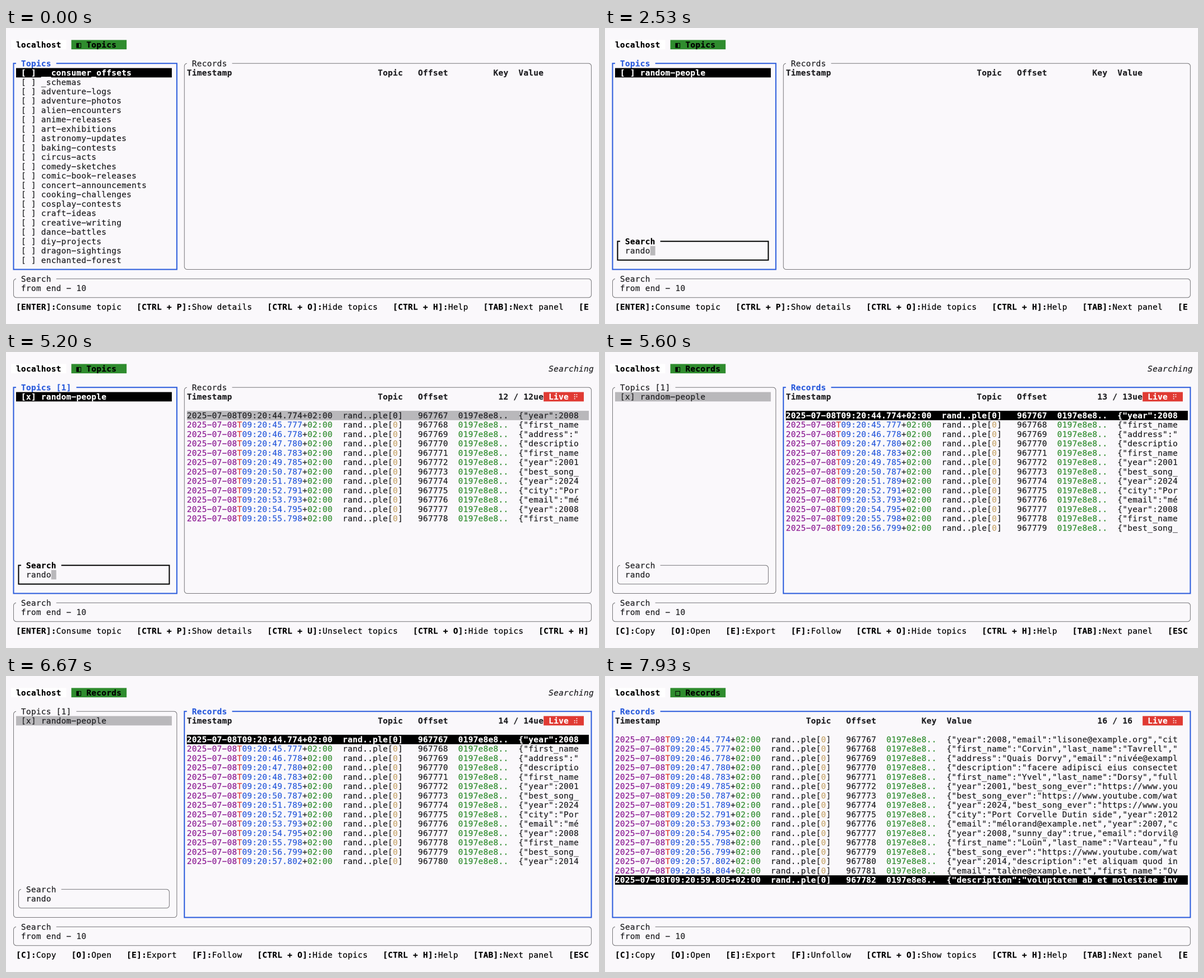
Recreate the animation shown at these times as an HTML page with a canvas. Size 1058 px wide and 529 px high, loop 8000 ms.

```html
<!DOCTYPE html>
<html lang="en">
<head>
<meta charset="utf-8">
<title>Topic browser</title>
<style>
  html, body { margin: 0; width: 100%; height: 100%; overflow: hidden; background: #faf8fb; }
  canvas { display: block; width: 1058px; height: 529px; }
</style>
</head>
<body>
<canvas id="screen" width="2116" height="1058"></canvas>
<script>
const ctx = document.getElementById('screen').getContext('2d');
ctx.scale(2, 2); // double resolution keeps fractional rows even
const LOOP = 8000;
const CW = 8.964, RH = 16.74, X0 = 9, Y0 = 21.4; // character grid
const BASELINE = 13.4;
const FONT = '14.4px "DejaVu Sans Mono", monospace';
const BG = '#faf8fb', INK = '#1f1f22', BLACK = '#000', WHITE = '#fff', GREY = '#b9b8bb', LINE = '#77767a';
const BLUE = '#2a5bdc', GREEN = '#2f8c2e', RED = '#e03a33', PURPLE = '#8c1b93', SAND = '#c6a56c';

// Moments of the session, in ms
const OPEN = 1470, TYPED = [1600, 1730, 2000, 2270, 2530], CONSUME = 4200;
const TAB = 5470, HIDE = 6730, FOUND = 7500, FOLLOW = 7800;
const ARRIVALS = [[4730, 12], [5260, 13], [6200, 14], [7190, 15], [7870, 16]];

const TOPICS = `__consumer_offsets _schemas adventure-logs adventure-photos alien-encounters
anime-releases art-exhibitions astronomy-updates baking-contests circus-acts comedy-sketches
comic-book-releases concert-announcements cooking-challenges cosplay-contests craft-ideas
creative-writing dance-battles diy-projects dragon-sightings enchanted-forest movie-trailers
pirate-adventures random-people space-exploration time-travel-logs travel-stories`.split(/\s+/);

const MILLIS = [774, 777, 778, 780, 783, 785, 787, 789, 791, 793, 795, 798, 799, 802, 804, 805];
const VALUES = [
  '{"year":2008,"email":"lisone@example.org","city"',
  '{"first_name":"Corvin","last_name":"Tavrell","fu',
  '{"address":"Quais Dorvy","email":"nivée@example.',
  '{"description":"facere adipisci eius consectetur',
  '{"first_name":"Yvel","last_name":"Dorsy","full_n',
  '{"year":2001,"best_song_ever":"https://www.youtu',
  '{"best_song_ever":"https://www.youtube.com/watch',
  '{"year":2024,"best_song_ever":"https://www.youtu',
  '{"city":"Port Corvelle Dutin side","year":2012,"',
  '{"email":"mélorand@example.net","year":2007,"cit',
  '{"year":2008,"sunny_day":true,"email":"dorvil@ex',
  '{"first_name":"Loün","last_name":"Varteau","full',
  '{"best_song_ever":"https://www.youtube.com/watch',
  '{"year":2014,"description":"et aliquam quod in e',
  '{"email":"talène@example.net","first_name":"Ovan',
  '{"description":"voluptatem ab et molestiae inven'
];

const px = col => X0 + col * CW;
const py = row => Y0 + row * RH;

function fill(col, row, cells, color) {
  ctx.fillStyle = color;
  ctx.fillRect(px(col), py(row), cells * CW, RH);
}

function text(col, row, str, color = INK, style = '') {
  ctx.font = `${style} ${FONT}`;
  ctx.fillStyle = ctx.strokeStyle = color;
  ctx.lineWidth = .2; // slightly fuller strokes, as on the terminal
  // the terminal face has a wide hyphen
  [...str.replace(/-/g, '\u2212')].forEach((ch, i) => {
    if (ch === ' ') return;
    const x = px(col + i), y = py(row) + BASELINE;
    ctx.fillText(ch, x, y);
    ctx.strokeText(ch, x, y);
  });
}

function panel(c0, r0, c1, r1, title, focus) {
  ctx.strokeStyle = focus || LINE;
  ctx.lineWidth = focus ? 2 : 1;
  ctx.beginPath();
  ctx.roundRect(px(c0 + .5), py(r0 + .5), (c1 - c0) * CW, (r1 - r0) * RH, focus ? 0 : 5);
  ctx.stroke();
  fill(c0 + 1, r0, title.length + 2, BG);
  text(c0 + 2, r0, title, focus || INK, focus ? 'bold' : '');
}

function selection(col, row, cells, focused) {
  fill(col, row, cells, focused ? BLACK : GREY);
  return focused ? [WHITE, 'bold'] : [INK, ''];
}

function drawTopics(t, focused) {
  const chosen = t >= CONSUME;
  const query = 'rando'.slice(0, TYPED.filter(at => t >= at).length);
  const searching = t >= OPEN;
  panel(0, 2, 32.5, 24, chosen ? 'Topics [1]' : 'Topics', focused && BLUE);
  TOPICS.filter(name => name.includes(query)).slice(0, searching ? 18 : 21).forEach((name, i) => {
    const look = i ? [] : selection(1, 3, 31, focused);
    text(2, 3 + i, `[${chosen ? 'x' : ' '}] ${name}`, ...look);
  });
  if (!searching) return;
  panel(1, 21, 31, 23, 'Search', focused && BLACK);
  text(3, 22, query);
  if (focused) fill(3 + query.length, 22, 1, GREY);
}

function drawRecord(i, left, selected, focused) {
  const row = 5 + i;
  const parts = [
    [0, '2025-07-08', PURPLE], [10, 'T', RED], [11, `09:20:${44 + i}.${MILLIS[i]}`, BLUE],
    [23, '+', INK], [24, '02:00', GREEN],
    [31, 'rand..ple[', INK], [41, '0', SAND], [42, ']', INK],
    [46, String(967767 + i), INK], [54, '0197e8e8..', GREEN],
    [66, VALUES[i].slice(0, 47 - left), INK]
  ];
  const look = selected && selection(left, row, 115 - left, focused);
  for (const [col, str, color] of parts) text(left + col, row, str, ...(look || [color]));
}

function drawLive(t) {
  fill(106, 3, 8, RED);
  text(107, 3, 'Live', WHITE, 'bold');
  const gap = Math.floor((t - CONSUME) / 69) % 6;
  ctx.fillStyle = WHITE;
  for (let i = 0; i < 6; i++) {
    if (i === gap) continue; // dots run down the right side and up the left
    const x = i < 3 ? 1018.3 : 1014.5, y = 76.2 + 3.6 * (i < 3 ? i : 5 - i);
    ctx.fillRect(x - .8, y - .8, 1.7, 1.7);
  }
}

function drawRecords(t, focused, hidden) {
  const left = hidden ? 1 : 35;
  const count = ARRIVALS.reduce((n, [at, total]) => t >= at ? total : n, 0);
  panel(left - 1, 2, 115, 24, 'Records', focused && BLUE);
  [[0, 'Timestamp'], [38, 'Topic'], [46, 'Offset'], [61, 'Key'], [66, 'Value']]
    .forEach(([col, name]) => text(left + col, 3, name, INK, 'bold'));
  const current = t >= FOLLOW ? count - 1 : 0;
  for (let i = 0; i < count; i++) drawRecord(i, left, i === current, focused);
  if (count) {
    fill(96, 3, 8, BG);
    text(97, 3, `${count} / ${count}`, INK, 'bold');
  }
  if (t >= CONSUME) drawLive(t);
}

function drawHelp(t, inRecords, hidden) {
  const keys = inRecords
    ? ['C:Copy', 'O:Open', 'E:Export', t >= FOLLOW ? 'F:Unfollow' : 'F:Follow']
    : ['ENTER:Consume topic', 'CTRL + P:Show details'];
  if (!inRecords && t >= CONSUME) keys.push('CTRL + U:Unselect topics');
  keys.push(`CTRL + O:${hidden ? 'Show' : 'Hide'} topics`, 'CTRL + H:Help', 'TAB:Next panel', 'ESC:Quit');
  let col = 1;
  const put = (str, style) => {
    text(col, 28, str.slice(0, Math.max(0, 115 - col)), BLACK, style);
    col += str.length;
  };
  for (const item of keys) {
    const [key, label] = item.split(':');
    put(`[${key}]:`, 'bold');
    put(label + '   ', '');
  }
}

function draw(t) {
  const inRecords = t >= TAB, hidden = t >= HIDE;
  ctx.fillStyle = BG;
  ctx.fillRect(0, 0, 1058, 529);

  fill(0, 0, 11, WHITE);
  text(1, 0, 'localhost', BLACK, 'bold');
  fill(12, 0, 11, GREEN);
  text(13, 0, `${hidden ? '□' : '◧'} ${inRecords ? 'Records' : 'Topics'}`, BLACK, 'bold');
  if (t >= CONSUME && t < FOUND) text(107, 0, 'Searching', INK, 'italic');

  if (!hidden) drawTopics(t, !inRecords);
  drawRecords(t, inRecords, hidden);
  panel(0, 25, 115, 27, 'Search');
  text(2, 26, 'from end - 10');
  drawHelp(t, inRecords, hidden);
}

const start = performance.now();
function tick() {
  draw((performance.now() - start) % LOOP);
  requestAnimationFrame(tick);
}
tick();
</script>
</body>
</html>
```
